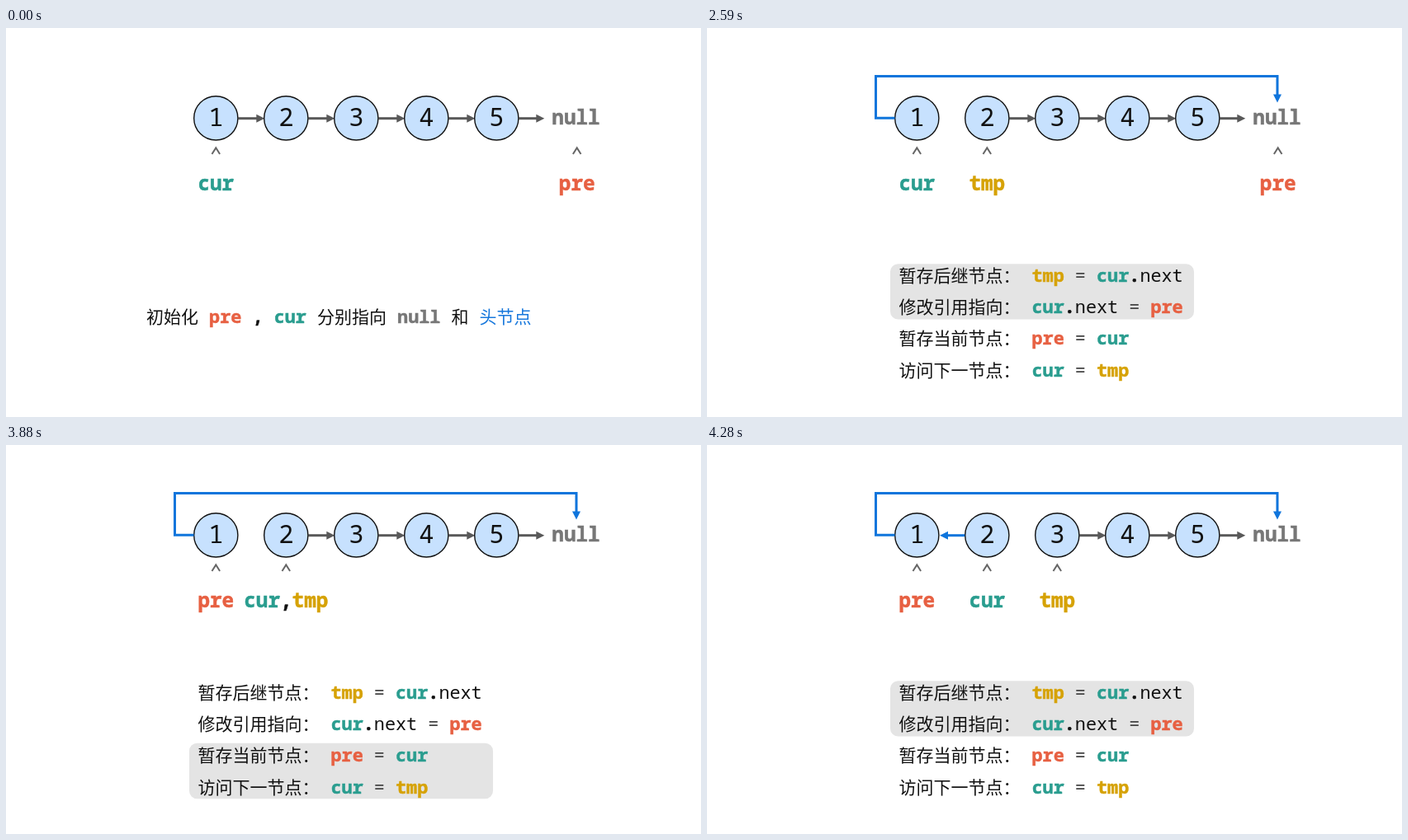
Write an HTML page that moves like this. It is 842x472 px and loops after 5.01 s.

```html
<!DOCTYPE html>
<html lang="zh-CN">
<head>
<meta charset="utf-8">
<style>
html, body { margin: 0; width: 100%; height: 100%; overflow: hidden; background: #fff; }
svg { display: block; width: 842px; height: 472px; }
text { font: 21.8px "Noto Sans Mono", "DejaVu Sans Mono", monospace; white-space: pre; fill: #111; }
.cjk { font: 21px "Noto Sans CJK SC", "Noto Sans CJK", sans-serif; }
.label { font-size: 24.3px; text-anchor: middle; }
.digit { font-size: 30.5px; text-anchor: middle; }
.cur, .pre, .tmp, .null, .dot { font-weight: 700; stroke-width: 0.5; }
.cur { fill: #2a9d8f; stroke: #2a9d8f; }
.pre { fill: #e76042; stroke: #e76042; }
.tmp { fill: #d6a206; stroke: #d6a206; }
.null { fill: #777; stroke: #777; }
.dot { stroke: #111; }
.equals { fill: #444; }
.head { fill: #1677dc; }
</style>
</head>
<body>
<svg id="stage" viewBox="0 0 842 472"></svg>
<script>
const LOOP = 5010;
const GRAY = '#595959', BLUE = '#0f75dc';
const nodeX = i => 254.3 + 85 * i;
const NULL_X = 691;

const span = (cls, s) => `<tspan class="${cls}">${s}</tspan>`;
const code = s => s.replace(/\b(?:cur|pre|tmp|null)\b|[.,=]/g,
  m => span(m === '=' ? 'equals' : m.length > 1 ? m : 'dot', m));
const cjk = (s, extra = '') => span(`cjk ${extra}`, s);
const text = (x, y, body, cls = '') => `<text x="${x}" y="${y}" class="${cls}">${body}</text>`;

// Straight arrow with a solid head, pointing along the last segment
function arrow(points, color) {
  const [[ax, ay], [bx, by]] = points.slice(-2);
  const angle = Math.atan2(by - ay, bx - ax) * 180 / Math.PI;
  const ux = Math.sign(bx - ax), uy = Math.sign(by - ay);
  const line = [...points.slice(0, -1), [bx - 8 * ux, by - 8 * uy]];
  return `<polyline points="${line.join(' ')}" fill="none" stroke="${color}" stroke-width="3"/>
    <path d="M0 0L-10 -5V5Z" fill="${color}" transform="translate(${bx} ${by}) rotate(${angle})"/>`;
}

function node(i) {
  return `<circle cx="${nodeX(i)}" cy="109.4" r="26.6" fill="#c7e1fe" stroke="#111" stroke-width="1.4"/>`
    + text(nodeX(i), 118.8, i + 1, 'digit');
}

function pointer(x, names) {
  return `<path d="M${x - 4.8} 153L${x} 145.4L${x + 4.8} 153" fill="none" stroke="#666" stroke-width="2"/>`
    + text(x, 196.6, code(names), 'label');
}

function list(firstLink) {
  let out = '';
  for (let i = firstLink; i < 5; i++) {
    const x = nodeX(i);
    out += arrow([[x + 27, 109.7], [i < 4 ? x + 59 : x + 58, 109.7]], GRAY);
  }
  for (let i = 0; i < 5; i++) out += node(i);
  return out + text(NULL_X - 0.5, 116.6, code('null'), 'label');
}

const wrap = () => arrow([[227.5, 109.2], [204.5, 109.2], [204.5, 58.5], [NULL_X, 58.5], [NULL_X, 90.5]], BLUE);
const back = () => arrow([[312.2, 109.7], [282, 109.7]], BLUE);

const intro = text(170, 358.2, cjk('初始化') + code(' pre , cur ') + cjk('分别指向')
  + code(' null ') + cjk('和') + ' ' + cjk('头节点', 'head'));

const rows = [
  ['暂存后继节点：', 'tmp = cur.next'],
  ['修改引用指向：', 'cur.next = pre'],
  ['暂存当前节点：', 'pre = cur'],
  ['访问下一节点：', 'cur = tmp']
];

function steps(half) {
  return `<rect x="222" y="${286.2 + 75.6 * half}" width="368" height="67.4" rx="9.5" fill="#e4e4e4"/>`
    + rows.map(([title, line], i) => {
      const y = 308 + 38.2 * i;
      return text(232.6, y, cjk(title)) + text(393.5, y, code(line));
    }).join('');
}

const scenes = [
  [0, list(0) + pointer(nodeX(0), 'cur') + pointer(NULL_X + 0.7, 'pre') + intro],
  [2220, list(1) + wrap() + pointer(nodeX(0), 'cur') + pointer(nodeX(1), 'tmp')
    + pointer(NULL_X + 0.7, 'pre') + steps(0)],
  [3190, list(1) + wrap() + pointer(nodeX(0), 'pre') + pointer(nodeX(1), 'cur,tmp') + steps(1)],
  [4160, list(2) + wrap() + back() + pointer(nodeX(0), 'pre') + pointer(nodeX(1), 'cur')
    + pointer(nodeX(2), 'tmp') + steps(0)]
];

const stage = document.getElementById('stage');
stage.innerHTML = scenes.map(([, body]) => `<g visibility="hidden">${body}</g>`).join('');
const groups = [...stage.children];
const start = performance.now();

function draw(now) {
  const t = Math.max(0, now - start) % LOOP;
  const active = scenes.filter(([at]) => at <= t).length - 1;
  groups.forEach((g, i) => g.setAttribute('visibility', i === active ? 'visible' : 'hidden'));
  requestAnimationFrame(draw);
}
draw(start);
</script>
</body>
</html>
```
